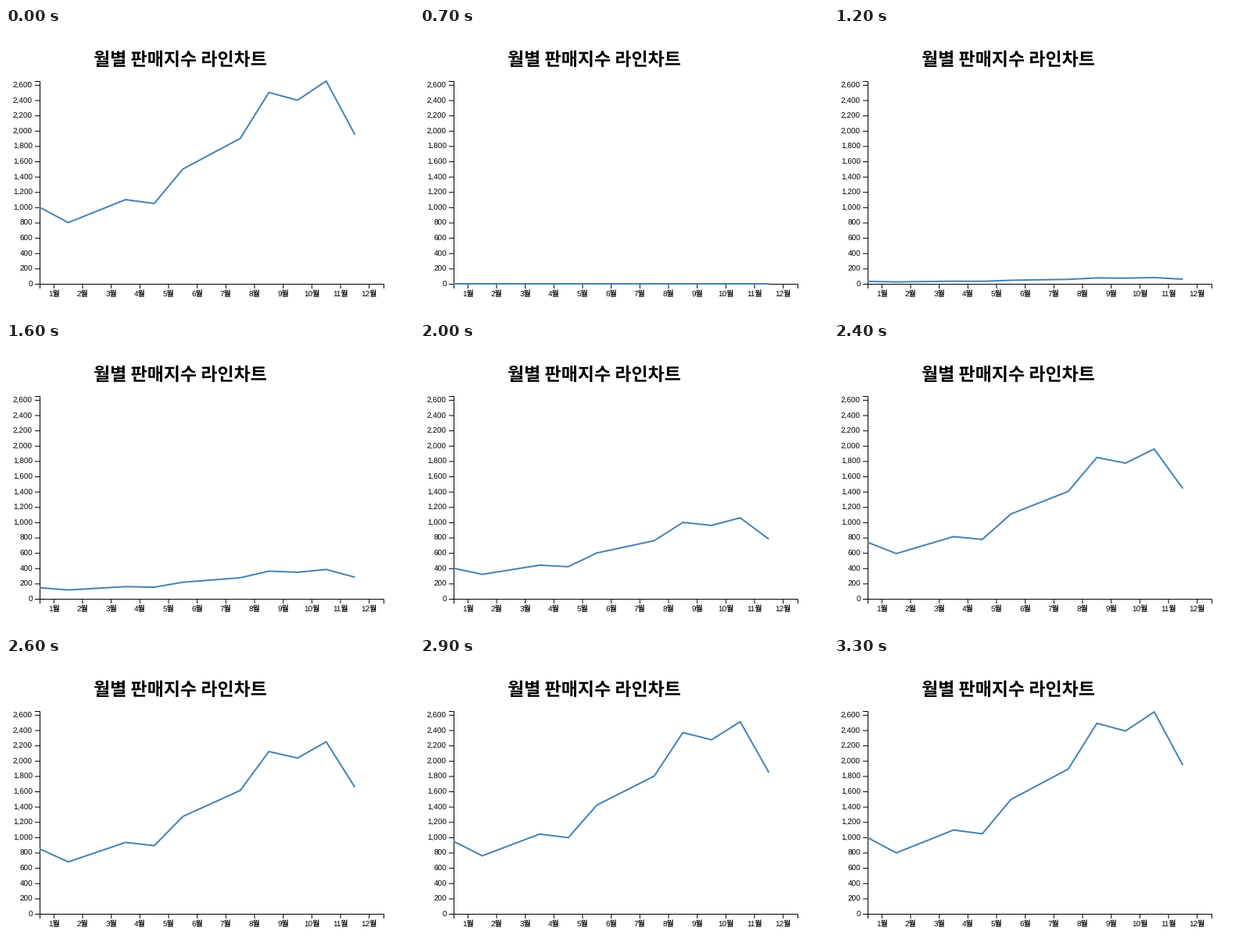
Recreate the animation shown at these times as a matplotlib script. Size 522 px wide and 368 px high, loop 3400 ms.

```python
import matplotlib.pyplot as plt
import numpy as np
from matplotlib.animation import FuncAnimation

W, H, DPI = 522, 368, 100
PT = 72 / DPI                       # points per pixel
LEFT, BOTTOM, PLOT_W, PLOT_H = 43, 328, 440, 260
TOP, RIGHT = BOTTOM - PLOT_H, LEFT + PLOT_W
TICK = 6
STEP_MS, LOOP_MS = 100, 3400
RESET_MS, HOLD_MS = 700, 1000       # line drops to zero, then starts to rise
EASE_START, EASE_MS = 608, 3000
LABEL_FONT = ["Liberation Sans", "Noto Sans CJK JP"]
TITLE_FONT = ["Noto Sans CJK JP"]

sales = np.array([1000, 800, 950, 1100, 1050, 1500,
                  1700, 1900, 2500, 2400, 2650, 1950])
band = PLOT_W / len(sales)
scale = PLOT_H / sales.max()

plt.rcParams["text.hinting"] = "none"
fig = plt.figure(figsize=(W / DPI, H / DPI), dpi=DPI, facecolor="white")
ax = fig.add_axes([0, 0, 1, 1])
ax.set_xlim(0, W)
ax.set_ylim(H, 0)
ax.axis("off")


def rule(x0, y0, x1, y1):
    ax.plot([x0, x1], [y0, y1], color="black", lw=PT,
            solid_capstyle="butt", snap=False)


def label(x, y, text, px, align="center", font=LABEL_FONT, weight="normal"):
    ax.text(x, y, text, fontsize=px * PT, ha=align, va="baseline",
            color="black", family=font, weight=weight)


def draw_axes():
    left, right, top, bottom = (v + 0.5 for v in (LEFT, RIGHT, TOP, BOTTOM))
    rule(left, top, left, bottom)
    rule(left, bottom, right, bottom)
    for y in (top, bottom):
        rule(LEFT - TICK, y, left, y)
    for x in (left, right):
        rule(x, bottom, x, BOTTOM + TICK)
    for value in range(0, 2601, 200):
        y = bottom - value * scale
        if value:
            rule(LEFT - TICK, y, LEFT, y)
        label(LEFT - 9, y + 3.2, f"{value:,}", 10, "right")
    for i in range(len(sales)):
        x = LEFT + (i + 0.5) * band
        rule(x, BOTTOM + 1, x, BOTTOM + TICK)
        label(x, BOTTOM + 16.1, f"{i + 1}월", 10)


def cubic_in_out(t):
    return 4 * t ** 3 if t < 0.5 else 1 - 4 * (1 - t) ** 3


def growth(ms):
    if ms < RESET_MS:
        return 1
    if ms < HOLD_MS:
        return 0
    return cubic_in_out((ms - EASE_START) / EASE_MS)


draw_axes()
label(223, 48, "월별 판매지수 라인차트", 23, font=TITLE_FONT, weight="bold")
line, = ax.plot(LEFT + band * np.arange(len(sales)), BOTTOM - sales * scale,
                color="steelblue", lw=2 * PT, solid_capstyle="butt",
                solid_joinstyle="miter", snap=False, zorder=5)


def update(frame):
    line.set_ydata(BOTTOM - sales * scale * growth(frame * STEP_MS))
    return line,


anim = FuncAnimation(fig, update, frames=LOOP_MS // STEP_MS,
                     interval=STEP_MS, repeat=True, repeat_delay=0)
plt.show()
```
